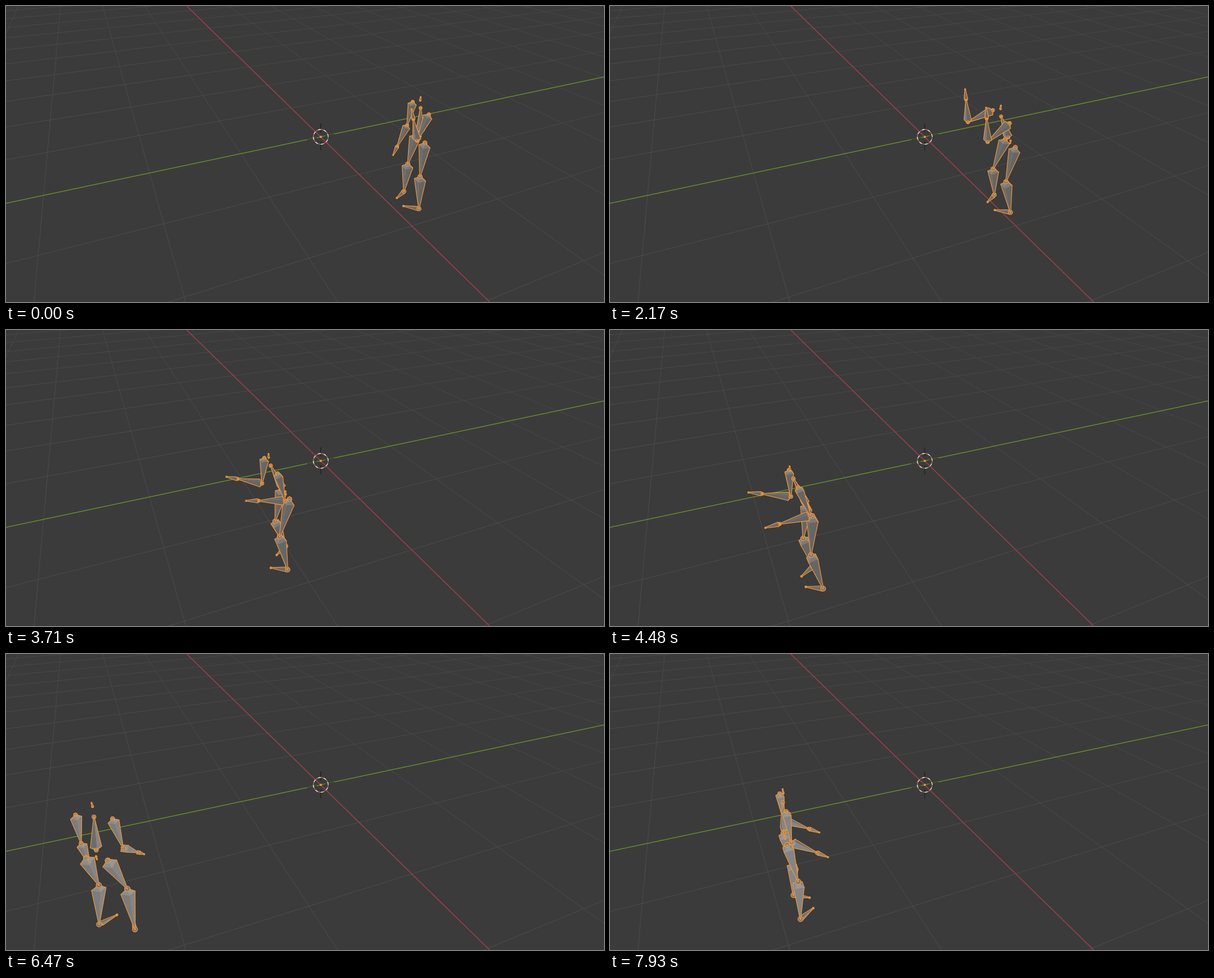
An HTML page with a canvas for the animation above (8000 ms loop, 1062x527 px).

```html
<!DOCTYPE html>
<html lang="en">
<head>
<meta charset="utf-8">
<title>Armature walk</title>
<style>
html, body { margin: 0; width: 100%; height: 100%; overflow: hidden; background: #3b3b3b; }
canvas { display: block; }
</style>
</head>
<body>
<canvas id="stage" width="1062" height="527"></canvas>
<script>
const ctx = document.getElementById('stage').getContext('2d');
const { sin, cos, PI, round, abs, hypot } = Math;
const W = 1062, H = 527, LOOP = 8000;
const START = 1080, STEP = 76.95;
const FOCAL = 801, TILT = .5246, HORIZON = -202;
const ORANGE = '#f2973a';
const SIDE_SHADES = ['#6c6c6c', '#858585', '#7c7c7c', '#666'];
const CAP_SHADES = ['#858585', '#979797', '#8c8c8c', '#7a7a7a'];

// Body sizes in world units; points are [right, forward, up].
const THIGH = 48, SHIN = 50, FOOT = 21, UPPER = 35, FORE = 32, HAND = 14;
const HIP = 12, SHOULDER = 20;

// x: place along the path, face: heading in degrees; arms: [upper, fore] pitch.
const keys = [
  { step: -1, x: 122, face: 197, lean: .13, bend: .06, armA: [.05, .35], armB: [.4, 2.85] },
  { step: 5, x: 122, face: 197, lean: .34, bend: .12, armA: [-.1, 1.57], armB: [-.15, 1.5], pace: 2 },
  { step: 23, x: 44, face: 204, lean: .5, bend: .33, armA: [.08, 2], armB: [-.2, 2.1] },
  { step: 44, x: -137, face: 206, lean: .27, bend: .17, armA: [.05, 1.95], armB: [-.22, 1.55], pace: .88 },
  { step: 59, x: -240, face: 200, lean: .2, bend: .03, armA: [-.18, -.2], armB: [-.2, -.1] },
  { step: 70, x: -239, face: 80, lean: .28, bend: .25, armA: [0, .8], armB: [0, .1], pace: 1.6 },
  { step: 89, x: -161, face: 23, lean: .08, bend: .1, armA: [0, .88], armB: [0, .95] }
];

const mix = (a, b, u) => a + (b - a) * u;
const add = (p, q, k = 1) => p.map((v, i) => v + q[i] * k);

function cross(a, b) {
  return [a[1] * b[2] - a[2] * b[1], a[2] * b[0] - a[0] * b[2], a[0] * b[1] - a[1] * b[0]];
}

function project([right, forward, up]) {
  const y = -30.5 - forward * sin(TILT) - up * cos(TILT);
  const z = FOCAL + forward * cos(TILT) - up * sin(TILT);
  return [W / 2 + FOCAL * (28 + right) / z, H / 2 + FOCAL * y / z, z];
}

function stateAt(step) {
  let k = 0;
  while (k < keys.length - 2 && step >= keys[k + 1].step) k++;
  const a = keys[k], b = keys[k + 1];
  const u = (step - a.step) / (b.step - a.step);
  const get = name => mix(a[name], b[name], u);

  // Travelling and turning both cost strides; the arms heave once per stride.
  const cycles = round((abs(b.x - a.x) + .7 * abs(b.face - a.face)) / 80);
  const lift = 1.2 * sin(PI * cycles * u) ** 2;
  const arm = name => a[name].map((v, i) => mix(v, b[name][i], u) + lift);
  return {
    x: mix(a.x, b.x, u ** (a.pace || 1)),
    face: get('face') * PI / 180,
    lean: get('lean'),
    bend: get('bend'),
    stride: .28 * sin(2 * PI * cycles * u),
    arms: [arm('armA'), arm('armB')]
  };
}

function skeleton(s) {
  const bones = [];
  const fwd = [cos(s.face), sin(s.face), 0];
  const left = [-sin(s.face), cos(s.face), 0];
  const dir = (pitch, out = 0) => add(add(fwd.map(v => v * sin(pitch)), left, out), [0, 0, -cos(pitch)]);
  const grow = (from, along, len) => {
    const to = add(from, along, len);
    bones.push({ from, to, len, along, left });
    return to;
  };
  const sides = [-1, 1];
  const legs = sides.map(side => [s.bend + side * s.stride, -.9 * s.bend + side * s.stride]);
  const height = Math.max(...legs.map(([t, c]) => THIGH * cos(t) + SHIN * cos(c)));
  const hip = [s.x, .42 * s.x - 241.5, height];
  const back = dir(PI - s.lean);

  grow(add(hip, [0, 0, 4]), [0, 0, -1], 4);
  const neck = grow(add(hip, back, 10), back, 35);
  grow(add(add(neck, fwd, 2), [0, 0, 10]), [0, 0, 1], 5);

  sides.forEach((side, i) => {
    const knee = grow(add(hip, left, side * HIP), dir(legs[i][0], side * .1), THIGH);
    const ankle = grow(knee, dir(legs[i][1], side * .1), SHIN);
    const toe = s.face - side * .6;
    grow(ankle, [cos(toe), sin(toe), 0], FOOT);

    const [upper, fore] = s.arms[i];
    const elbow = grow(add(neck, left, side * SHOULDER), dir(upper, side * .1), UPPER);
    const wrist = grow(elbow, dir(fore), FORE);
    grow(wrist, dir(fore), HAND);
  });
  return bones;
}

function line(x1, y1, x2, y2, color, width) {
  ctx.strokeStyle = color;
  ctx.lineWidth = width;
  ctx.beginPath();
  ctx.moveTo(x1, y1);
  ctx.lineTo(x2, y2);
  ctx.stroke();
}

function trace(points) {
  ctx.beginPath();
  points.forEach(p => ctx.lineTo(p[0], p[1]));
  ctx.closePath();
}

function ball(p, r, fill) {
  ctx.beginPath();
  ctx.arc(p[0], p[1], r, 0, 7);
  if (fill) {
    ctx.fillStyle = fill;
    ctx.fill();
  }
  ctx.stroke();
}

const facing = ([a, b, c]) => (b[0] - a[0]) * (c[1] - a[1]) - (b[1] - a[1]) * (c[0] - a[0]) > 0;

function drawBone({ from, to, len, along, left }) {
  const head = project(from), tail = project(to);
  const r = Math.max(1, len * .056 * FOCAL / head[2]);
  ctx.strokeStyle = ORANGE;
  ctx.lineWidth = 1.2;
  ball(head, r, '#777');
  ball(tail, r, '#777');

  // Octahedron: a square ring near the head, closed by both joints.
  const w = len * .1, depth = cross(along, left);
  const ring = [[1, 1], [-1, 1], [-1, -1], [1, -1]].map(([p, q]) =>
    project(add(add(add(from, along, w), left, p * w), depth, q * w)));
  const faces = [];
  ring.forEach((c, i) => {
    const next = ring[(i + 1) % 4];
    faces.push({ pts: [head, c, next], fill: CAP_SHADES[i] });
    faces.push({ pts: [tail, next, c], fill: SIDE_SHADES[i] });
  });
  const shown = faces.filter(f => facing(f.pts));
  ctx.lineWidth = 2.3;
  shown.forEach(f => { trace(f.pts); ctx.stroke(); });
  shown.forEach(f => { trace(f.pts); ctx.fillStyle = f.fill; ctx.fill(); });
  ctx.lineWidth = 1;
  ball(head, r);
}

function drawFloor() {
  ctx.fillStyle = '#3b3b3b';
  ctx.fillRect(0, 0, W, H);
  const fade = ctx.createLinearGradient(480, 0, 420, 260);
  fade.addColorStop(0, '#454545');
  fade.addColorStop(1, '#4b4b4b');
  for (let k = -5; k < 11; k++) {
    const x = 321 + 74.7 * k;
    if (k) line(x, 0, x + (x - 115) * H / -HORIZON, H, fade, 1);
  }
  for (let k = -14; k < 4; k++) {
    const y = 1 / (.001808 - .000294 * k) + HORIZON;
    if (k) line(0, y, 2611, HORIZON, fade, 1);
  }
  line(0, 351.3, W, 126.2, '#668b2d', 1.4);
  line(321, 0, 859, H, '#a1414a', 1.5);
}

function drawCursor() {
  const x = 559, y = 233;
  for (const s of [-1, 1]) {
    line(x, y + 8 * s, x, y + 24 * s, '#171717', 1);
    line(x + 7 * s, y - 1.5 * s, x + 24 * s, y - 5 * s, '#29371c', 1);
  }
  ctx.lineWidth = 1.4;
  for (let i = 0; i < 16; i++) {
    ctx.strokeStyle = i % 2 ? '#eee' : '#bd6257';
    ctx.beginPath();
    ctx.arc(x, y, 13.2, i * PI / 8, (i + 1) * PI / 8);
    ctx.stroke();
  }
  ctx.fillStyle = '#f59a3c';
  ctx.beginPath();
  ctx.arc(x, y, 2, 0, 7);
  ctx.fill();
}

function draw(time) {
  const t = time % LOOP;
  const step = t < START ? -1 : Math.floor((t - START) / STEP);
  const far = b => project(b.from)[2] + project(b.to)[2];
  drawFloor();
  ctx.lineJoin = 'round';
  skeleton(stateAt(step)).sort((a, b) => far(b) - far(a)).forEach(drawBone);
  drawCursor();
}

let begin = null;
function tick(now) {
  if (begin === null) begin = now;
  draw(now - begin);
  requestAnimationFrame(tick);
}
draw(0);
requestAnimationFrame(tick);
</script>
</body>
</html>
```
